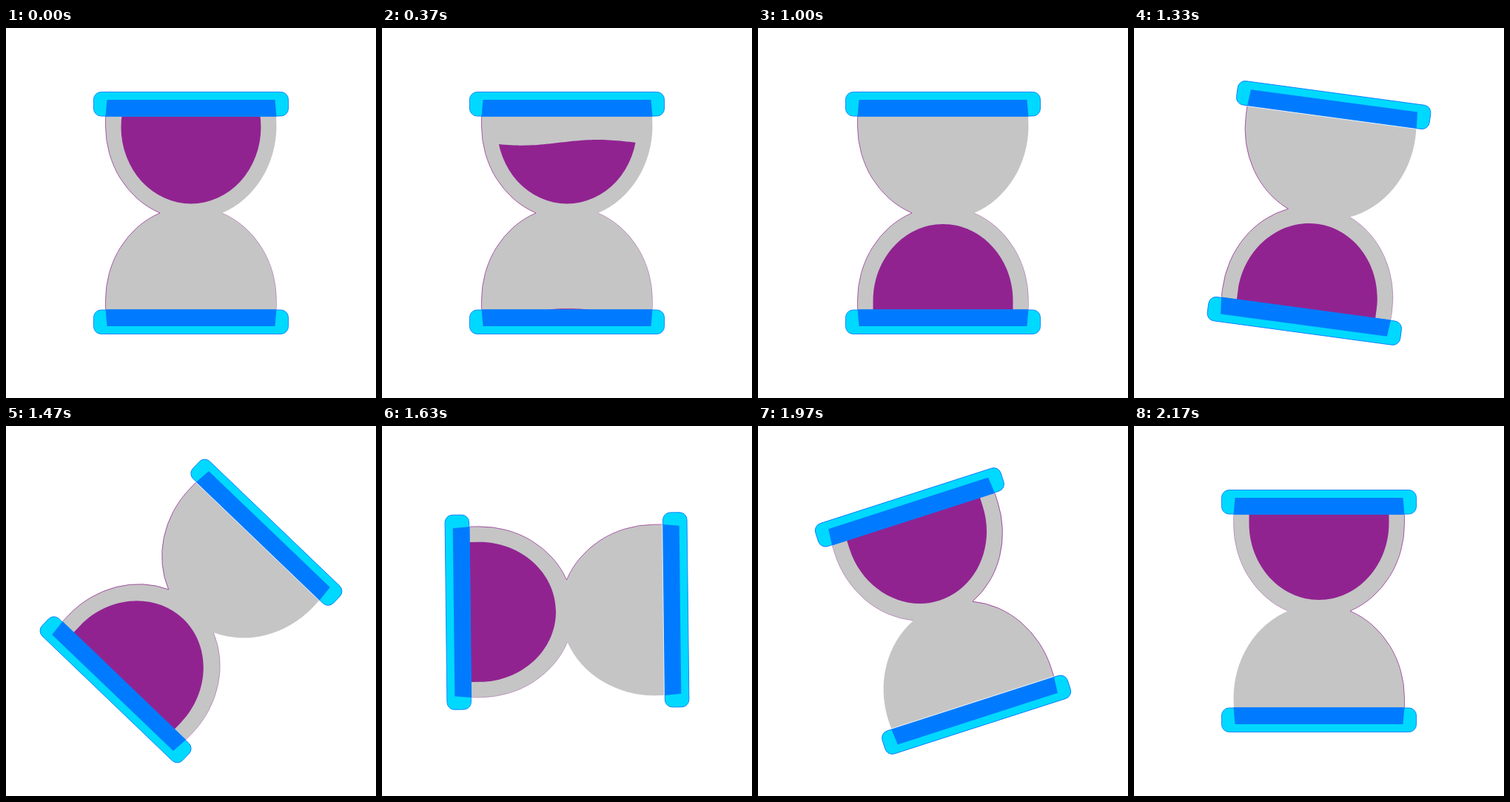
These frames come from a looping animation (500x500 px, 2330 ms). An HTML page:

```html
<!DOCTYPE html>
<html lang="en">
<head>
<meta charset="utf-8">
<title>Hourglass</title>
<style>
  html, body { margin: 0; width: 100%; height: 100%; overflow: hidden; background: #fff; }
  svg { display: block; width: 100%; height: 100%; }
  .glass { fill: #c5c5c5; }
  .sand { fill: #912391; }
  .cap { fill: #00d9ff; stroke: #007bff; stroke-width: .9; }
  .shade { fill: #007bff; }
  .rim { fill: none; stroke: #912391; stroke-width: .7; }
  .faint { opacity: .5; }
  .gap { stroke: #fff; stroke-width: .8; }
</style>
</head>
<body>
<svg viewBox="0 0 500 500">
  <defs>
    <path id="bulb" d="M136.5 97H363.5Q365.5 114 365.5 132A115.5 126.6 0 0 1 292 250L292 258H208L208 250A115.5 126.6 0 0 1 134.5 132Q134.5 114 136.5 97Z"/>
    <g id="lid">
      <rect class="cap" x="118.5" y="86.5" width="263" height="32.5" rx="10"/>
      <path class="shade" d="M136.5 97H363.5L365.5 119.8H134.5Z"/>
    </g>
    <clipPath id="bowl"><ellipse cx="250" cy="134" rx="94.5" ry="103.5"/></clipPath>
    <clipPath id="floor"><rect x="150" y="250" width="200" height="140"/></clipPath>
  </defs>
  <g id="hourglass">
    <use href="#bulb" class="glass"/>
    <use href="#bulb" class="glass" transform="rotate(180 250 250)"/>
    <path class="rim" d="M134.5 119V132A115.5 126.6 0 0 0 208 250A115.5 126.6 0 0 0 134.5 368V380"/>
    <path class="rim faint" d="M292 250A115.5 126.6 0 0 1 365.5 368V380"/>
    <path id="top" class="sand" clip-path="url(#bowl)"/>
    <path id="heap" class="sand" clip-path="url(#floor)"/>
    <use href="#lid"/>
    <use href="#lid" transform="rotate(180 250 250)"/>
    <path id="gap" class="gap" d="M134.5 119.9H365.5"/>
  </g>
</svg>
<script>
  const LOOP = 2330, FALL = 1000, TURN = 1300, TURN_TIME = 867;
  const byId = id => document.getElementById(id);
  const glass = byId('hourglass'), topSand = byId('top'), heap = byId('heap'), gap = byId('gap');
  const clamp = v => Math.min(1, Math.max(0, v));
  const bez = (a, b, s) => 3 * a * s * (1 - s) ** 2 + 3 * b * s * s * (1 - s) + s ** 3;

  // cubic-bezier(.167, .167, .667, 1), solved by bisection
  function turnEase(x) {
    let lo = 0, hi = 1;
    for (let i = 0; i < 30; i++) {
      const mid = (lo + hi) / 2;
      if (bez(.167, .667, mid) < x) lo = mid; else hi = mid;
    }
    return bez(.167, 1, hi);
  }

  // Falling level with a rocking surface
  function topPath(p) {
    if (p >= 1) return '';
    const level = 119.5 + 118 * (p - .72 * p * (1 - p) ** 3);
    const amp = 4.4 * Math.sin(2 * Math.PI * p / 1.1);
    let d = 'M150 240';
    for (let x = 150; x <= 350; x += 4) {
      const y = level - amp * Math.sin(2 * Math.PI * (x - 240) / 205);
      d += `L${x} ${y.toFixed(2)}`;
    }
    return d + 'V240Z';
  }

  // Rising heap that settles into a half ellipse
  function heapPath(p) {
    const k = p * p * (3 - 2 * p), r = 1 - k;
    const crest = 265 + 164.5 * r, mid = 250 - 16 * r * k, arm = 52 - 40 * r;
    const leftY = 368.5 + 25 * r, rightY = 368.5 + 94 * r;
    const left = 155.5, right = 344.5 - 10 * r;
    const lift = Math.min(0, 149 * r - 57);
    return `M${left} 480V${leftY}` +
      `C${left + 57 * r} ${leftY + lift} ${mid - arm} ${crest} ${mid} ${crest}` +
      `S${right} ${rightY - 57} ${right} ${rightY}V480Z`;
  }

  // The motion advances on a 30 per second beat, rounded to 10 ms
  function beat(t) {
    let n = 0;
    while (10 * Math.round((n + 1) * 10 / 3) <= t) n++;
    return n * 100 / 3;
  }

  function draw(time) {
    const t = beat(time % LOOP);
    const fall = clamp(t / FALL), turn = clamp((t - TURN) / TURN_TIME);
    topSand.setAttribute('d', topPath(fall));
    heap.setAttribute('d', heapPath(fall));
    glass.setAttribute('transform', `rotate(${180 * turnEase(turn)} 250 250)`);
    gap.setAttribute('visibility', turn > .001 && turn < .999 ? 'visible' : 'hidden');
  }

  const start = performance.now();
  function tick() {
    draw(performance.now() - start);
    requestAnimationFrame(tick);
  }
  tick();
</script>
</body>
</html>
```
